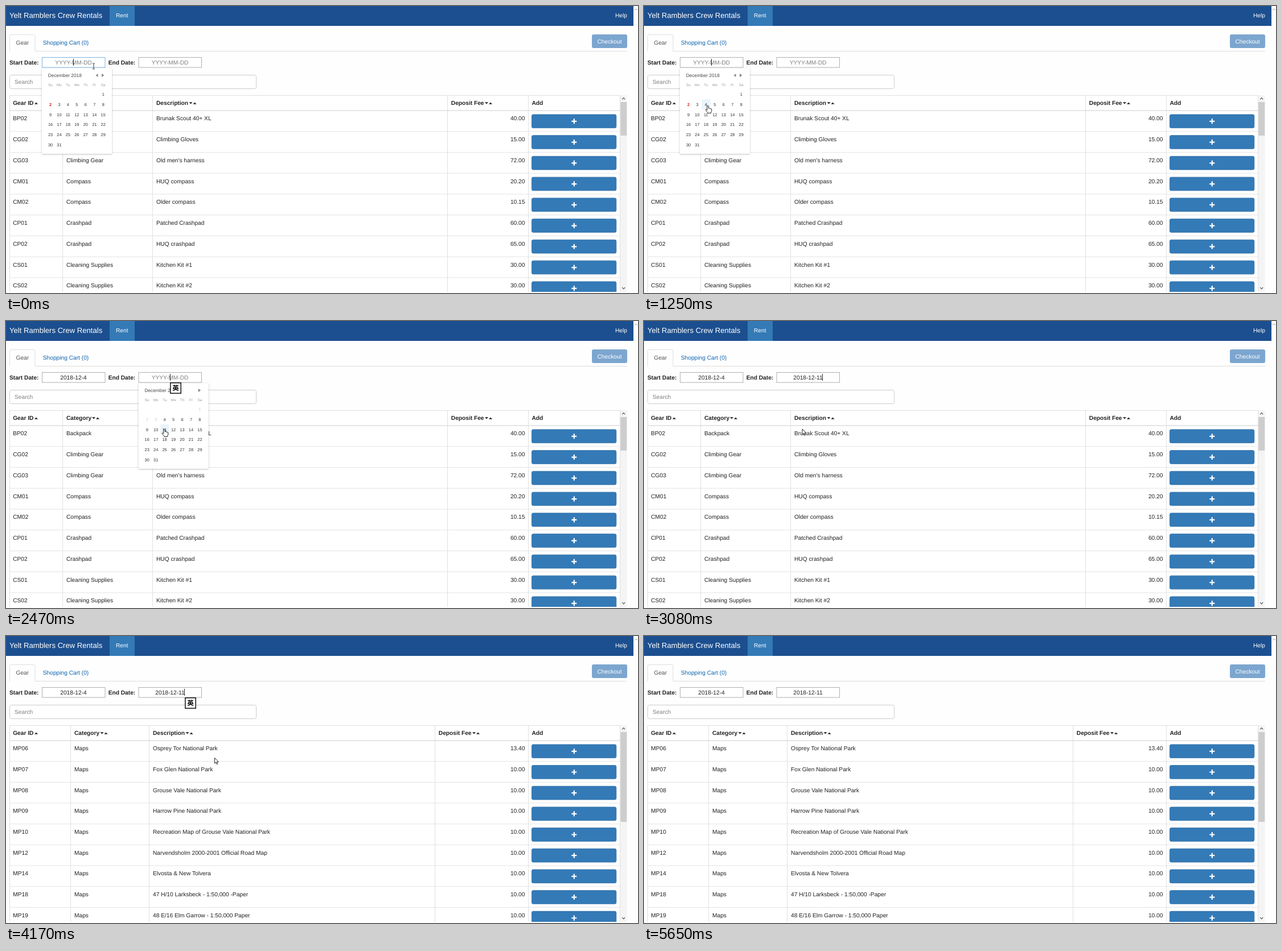
An HTML page for the animation above (5750 ms loop, 1110 by 505 pixels).

```html
<!DOCTYPE html>
<html lang="en">
<head>
<meta charset="utf-8">
<title>Gear rentals</title>
<style>
html, body { margin: 0; width: 100%; height: 100%; overflow: hidden; background: #fefefe; }
svg { display: block; width: 1110px; height: 505px; }
text { font: 10.2px "Liberation Sans", Arial, sans-serif; fill: #222; text-rendering: geometricPrecision; white-space: pre; }
.b { font-weight: bold; }
.mid { text-anchor: middle; }
.end { text-anchor: end; }
.white { fill: #fff; }
.brand { font-size: 13.1px; fill: #fff; }
.link { fill: #0d63ad; }
.tab { fill: #555; }
.hint { fill: #808080; }
.month { font-size: 8.3px; fill: #444; }
.week { font-size: 6.3px; fill: #999; text-anchor: middle; }
.day { font-size: 7.4px; fill: #333; text-anchor: middle; }
.today { fill: #e01b1b; font-weight: bold; }
.off { fill: #ccc; }
.ime { font: bold 11.5px "Noto Sans CJK SC", "Noto Sans CJK JP", sans-serif; fill: #000; text-anchor: middle; }
#cal { filter: drop-shadow(0 1.5px 1.5px rgba(0, 0, 0, .25)); }
</style>
</head>
<body>
<svg viewBox="0 0 1110 505">
  <g id="page"></g>
  <g id="table"></g>
  <g id="fields"></g>
  <g id="cal"></g>
  <g id="top"></g>
</svg>
<script>
const LOOP = 5750;
const $ = id => document.getElementById(id);
const rect = (x, y, w, h, fill, more = '') =>
  `<rect x="${x}" y="${y}" width="${w}" height="${h}" fill="${fill}" ${more}/>`;
const path = (d, fill, more = '') => `<path d="${d}" fill="${fill}" ${more}/>`;
const line = (d, color, more = '') => path(d, 'none', `stroke="${color}" ${more}`);
const text = (x, y, s, cls = '') =>
  `<text x="${x}" y="${y}" class="${cls}">${s.replace(/&/g, '&amp;')}</text>`;

// Table views: columns, header carets, rows
const gear = {
  pitch: 36.75, thumb: 59, cols: [99.5, 257.5, 775.5], carets: [154, 324.5, 844],
  rows: [
    ['BP02', 'Backpack', 'Brunak Scout 40+ XL', '40.00'],
    ['CG02', 'Climbing Gear', 'Climbing Gloves', '15.00'],
    ['CG03', 'Climbing Gear', "Old men's harness", '72.00'],
    ['CM01', 'Compass', 'HUQ compass', '20.20'],
    ['CM02', 'Compass', 'Older compass', '10.15'],
    ['CP01', 'Crashpad', 'Patched Crashpad', '60.00'],
    ['CP02', 'Crashpad', 'HUQ crashpad', '65.00'],
    ['CS01', 'Cleaning Supplies', 'Kitchen Kit #1', '30.00'],
    ['CS02', 'Cleaning Supplies', 'Kitchen Kit #2', '30.00']
  ]
};
const maps = {
  pitch: 36.68, thumb: 158, cols: [113.5, 251.5, 753.5], carets: [168.5, 318.5, 822],
  rows: [
    ['06', 'Osprey Tor National Park'],
    ['07', 'Fox Glen National Park'],
    ['08', 'Grouse Vale National Park'],
    ['09', 'Harrow Pine National Park'],
    ['10', 'Recreation Map of Grouse Vale National Park'],
    ['12', 'Narvendsholm 2000-2001 Official Road Map'],
    ['14', 'Elvosta & New Tolvera'],
    ['18', '47 H/10 Larksbeck - 1:50,000 -Paper'],
    ['19', '48 E/16 Elm Garrow - 1:50,000 Paper']
  ].map(([id, name], i) => ['MP' + id, 'Maps', name, i ? '10.00' : '13.40'])
};

// Each step changes some of the state; the rest carries over
const steps = [
  [0, { x: 154, y: 106, view: gear, start: '', end: '', field: 0, caret: 1, ime: 0, cal: 0, glow: 1 }],
  [120, { y: 107, ime: 1 }],
  [260, { x: 132, y: 162 }],
  [400, { x: 121, y: 172, glow: 0 }],
  [520, { x: 116, y: 184, caret: 0 }],
  [640, { x: 113, y: 179 }],
  [760, { x: 112, y: 176 }],
  [880, { x: 112, y: 175 }],
  [1000, { caret: 1 }],
  [1250, { ime: 0 }],
  [1500, { start: '2018-12-4', caret: 0, cal: -1 }],
  [1620, { x: 200, y: 132 }],
  [1740, { x: 285, y: 101, field: 1, caret: 1 }],
  [1860, { x: 297, y: 146, cal: 1, ime: 1 }],
  [1980, { x: 303, y: 198, caret: 0 }],
  [2100, { x: 293, y: 194 }],
  [2220, { x: 285, y: 191 }],
  [2470, { x: 278, y: 190, caret: 1 }],
  [2840, { end: '2018-12-11', field: 2, cal: -1, ime: 0 }],
  [3200, { view: maps }],
  [3440, { caret: 0 }],
  [3560, { ime: 1 }],
  [3800, { caret: 1 }],
  [4170, { x: 366.5, y: 214.5 }],
  [4290, { x: 560, y: 296 }],
  [4410, { x: 760, y: 392, caret: 0 }],
  [4530, { x: 945, y: 488 }],
  [4650, { x: 1000, y: 600 }],
  [4900, { caret: 1 }],
  [5400, { caret: 0 }],
  [5650, { ime: 0 }]
];
let carry = {};
const states = steps.map(([at, change]) => (carry = { ...carry, ...change, at }));

// Calendar grid
const calX = cal => cal * 169.7;
const colX = c => 78 + c * 15.45;
const rowY = r => 155.5 + r * 17.7;
const firstDay = cal => (cal ? 4 : 1);

function dayAt({ x, y, cal }) {
  if (cal < 0) return 0;
  const c = Math.floor((x - calX(cal) - 70.3) / 15.45);
  const r = Math.floor((y - 146.7) / 17.7);
  const day = r * 7 + c - 5;
  return c >= 0 && c < 7 && r >= 0 && day >= firstDay(cal) && day <= 31 ? day : 0;
}

const buttonY = (view, i) => 190.5 + i * view.pitch;
const buttonAt = ({ x, y, view }) => x < 923 || x > 1072 ? -1 :
  view.rows.findIndex((_, i) => y > buttonY(view, i) && y < Math.min(503, buttonY(view, i) + 24.5));
const inField = ({ x, y }) => y > 90 && y < 109 && ((x > 63 && x < 174) || (x > 232 && x < 344));

function drawPage() {
  const chevron = (x, y, s) => line(`M${x - 2.5} ${y + s}L${x} ${y - s}L${x + 2.5} ${y + s}`, '#555', 'stroke-width="1.2"');
  $('page').innerHTML =
    rect(0, 0, 1102, 35, '#1c4f8f') + rect(182, 0, 44, 35, '#337ab7') +
    text(6, 21, 'Yelt Ramblers Crew Rentals', 'brand') +
    text(193, 20, 'Rent', 'white') + text(1070, 20, 'Help', 'white') +
    line('M1104 7.5L1106.5 5L1109 7.5', '#999') +
    line('M6 79.5H6.5V53Q6.5 50.5 9 50.5H48.5Q51 50.5 51 53V79.5H1091', '#ddd') +
    text(17.5, 68.3, 'Gear', 'tab') + text(64.8, 68.3, 'Shopping Cart (0)', 'link') +
    rect(1029, 50, 62, 24, '#7ca6cf', 'rx="3"') + text(1060, 65.6, 'Checkout', 'mid white') +
    text(6, 102.6, 'Start Date:', 'b') + text(179.7, 102.6, 'End Date:', 'b') +
    rect(6.5, 121.5, 433, 24, '#fff', 'rx="3" stroke="#ccc"') + text(15, 137.2, 'Search', 'hint') +
    rect(1079, 157, 11.5, 346, '#f4f4f4') + chevron(1084.7, 163, 1.3) + chevron(1084.7, 496.5, -1.3);
}

function drawTable(s) {
  const { view } = s, [a, b, c] = view.cols, hot = buttonAt(s);
  const up = x => path(`M${x - 3} 172.7h6l-3 -3.3z`, '#222');
  const down = x => path(`M${x - 3} 169.3h6l-3 3.3z`, '#222');
  const xs = [12.2, a + 6.5, b + 6.5, c + 6.3];
  let out = rect(6, 157, 1073, 346, '#fff') +
    ['Gear ID', 'Category', 'Description', 'Deposit Fee'].map((h, i) => text(xs[i], 174, h, 'b')).join('') +
    text(923.5, 174, 'Add', 'b') + up(53) +
    view.carets.map(x => down(x) + up(x + 7)).join('') +
    line('M6 184H1079', '#ddd', 'stroke-width="1.4"');
  view.rows.forEach(([id, kind, name, fee], i) => {
    const y = 184 + i * view.pitch, top = buttonY(view, i), base = y + 17.3, mid = top + 12.3;
    out += line(`M6 ${y + view.pitch}H1079`, '#ddd', 'stroke-width=".8"') +
      text(xs[0], base, id) + text(xs[1], base, kind) + text(xs[2], base, name) + text(911.4, base, fee, 'end') +
      rect(923.4, top + .4, 148.4, 23.7, i === hot ? '#286090' : '#337ab7', 'rx="2.6" stroke="#2e6da4" stroke-width=".8"') +
      line(`M993.3 ${mid}h9M997.8 ${mid - 4.5}v9`, '#fff', 'stroke-width="2.2"');
  });
  out += line([6.5, a, b, c, 917.5, 1078.5].map(x => `M${x} 157V503`).join('') + 'M6 157.5H1079', '#ddd', 'stroke-width=".9"') +
    rect(1079.3, 169, 11, view.thumb, '#cdcdcd') + rect(0, 503, 1110, 2, '#fefefe');
  $('table').innerHTML = out;
}

function drawFields(s) {
  const field = (x, value, color) => rect(x + .5, 90.5, 110.5, 17.6, '#fff', `stroke="${color}"`) +
    text(x + 55.5, 102.8, value || 'YYYY-MM-DD', value ? 'mid' : 'mid hint');
  $('fields').innerHTML = field(63, s.start, s.glow ? '#7fb2e5' : '#b0b0b0') + field(232.5, s.end, '#b0b0b0') +
    (s.caret ? rect([118, 288, 313][s.field], 93, 1, 12, '#222') : '');
}

function drawCalendar(s) {
  const { cal } = s;
  if (cal < 0) return void ($('cal').innerHTML = '');
  const hot = dayAt(s);
  let out = rect(63, 109.5, 123, 150.5, '#fff') + text(73.8, 124.8, 'December 2018', 'month') +
    (cal ? '' : path('M161.5 119v6l-4 -3z', '#888')) + path('M168 119v6l4.5 -3z', '#888') +
    ['Su', 'Mo', 'Tu', 'We', 'Th', 'Fr', 'Sa'].map((d, c) => text(colX(c), 141, d, 'week')).join('');
  for (let day = 1; day <= 31; day++) {
    const x = colX((day + 5) % 7), y = rowY(Math.floor((day + 5) / 7));
    const cls = day < firstDay(cal) ? 'day off' : day === 2 ? 'day today' : 'day';
    if (day === hot) out += rect(x - 7.7, y - 8.8, 15.4, 17.4, '#eaf4fc', 'rx="1.5"');
    out += text(x, y + 2.7, String(day), cls);
  }
  $('cal').innerHTML = `<g transform="translate(${calX(cal)})">${out}</g>`;
}

function drawTop(s) {
  const ink = 'stroke="#111" stroke-width=".9" stroke-linejoin="round"';
  const ix = [118, 288, 314][s.field];
  let out = s.ime ? rect(ix + .8, 108.8, 18.4, 18.4, '#fff', 'stroke="#111" stroke-width="1.5"') + text(ix + 10, 122.3, '英', 'ime') : '';
  const shape = inField(s)
    ? line('M-2 -5H-.6L0 -4.4L.6 -5H2M0 -4.4V4.4M-2 5H-.6L0 4.4L.6 5H2', '#222', 'stroke-width=".9"')
    : dayAt(s) || buttonAt(s) >= 0
      ? path('M-1.2 1Q0 -.8 1.2 1V5Q2.4 4 3.2 5.3Q4.4 4.6 5 5.8Q6.6 5.3 6.8 7V9.5Q6.4 11.2 5.6 12V13.5H-.4V12.4L-3.6 8.6Q-4.2 6.6 -2.6 7L-1.2 8.3Z', '#fff', ink)
      : path('M0 0V9.6L2.2 7.6L3.7 11.2L5.3 10.5L3.8 7H6.8Z', '#fff', ink);
  $('top').innerHTML = out + `<g transform="translate(${s.x} ${s.y})">${shape}</g>`;
}

let shown;
function frame(now) {
  const t = now % LOOP;
  const state = states.findLast(s => s.at <= t);
  if (state !== shown) {
    shown = state;
    [drawTable, drawFields, drawCalendar, drawTop].forEach(draw => draw(state));
  }
  requestAnimationFrame(() => frame(performance.now() - began));
}

drawPage();
const began = performance.now();
frame(0);
</script>
</body>
</html>
```
